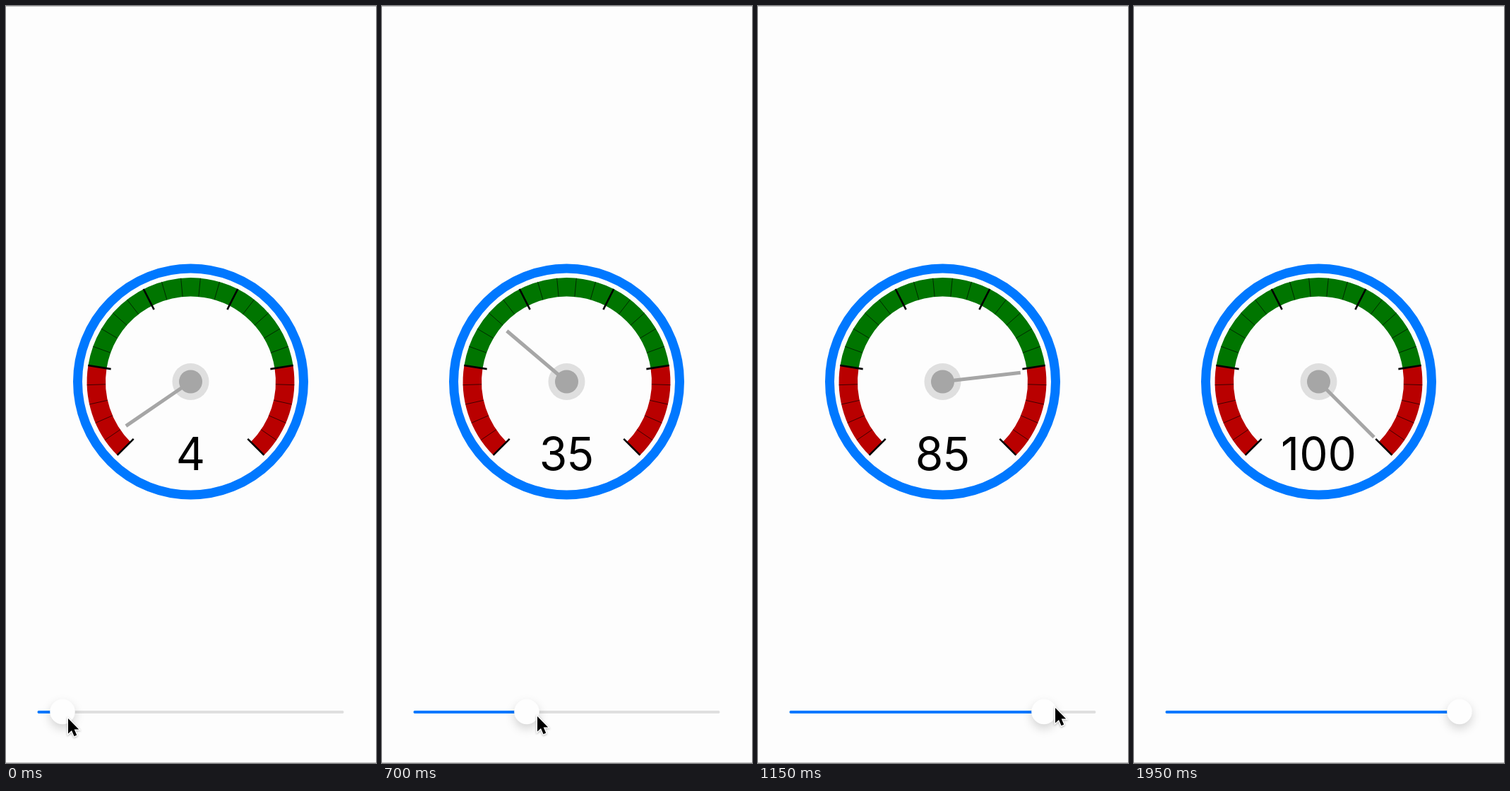
Animation of 524x1070 px, one loop 2000 ms. Source, as an HTML page with a canvas:

```html
<!DOCTYPE html>
<html lang="en">
<head>
<meta charset="utf-8">
<title>Gauge with slider</title>
<style>
  html, body { margin: 0; width: 100%; height: 100%; overflow: hidden; background: #fdfdfd; }
  canvas { display: block; }
</style>
</head>
<body>
<canvas id="stage" width="524" height="1070"></canvas>
<script>
const ctx = document.getElementById('stage').getContext('2d');
const LOOP = 2000, STEP = 50, NEEDLE_LAG = 48;
const CX = 261.5, CY = 531;
const TRACK = { left: 44.5, right: 478.5, y: 998, min: 62, max: 461 };
const BLUE = '#0078ff', PAPER = '#fdfdfd';

// Motion keys: [time, position]
const knobKeys = [[-50, 77.6], [0, 80], [500, 142.5], [700, 205], [950, 314], [1150, 405], [1350, 472]];
const mouseX = [[-50, 85.5], [0, 88], [500, 157], [700, 220], [950, 336], [1150, 421], [1350, 494], [1650, 514], [1800, 528]];
const mouseY = [[0, 1007], [500, 1005], [700, 1004], [950, 995], [1150, 992], [1350, 990], [1800, 990]];

const slope = (a, b) => (b[1] - a[1]) / (b[0] - a[0]);

function tangent(keys, i) {
  if (i === 0) return slope(keys[0], keys[1]);
  if (i === keys.length - 1) return slope(keys[i - 1], keys[i]);
  const before = keys[i][0] - keys[i - 1][0], after = keys[i + 1][0] - keys[i][0];
  return (slope(keys[i - 1], keys[i]) * after + slope(keys[i], keys[i + 1]) * before) / (before + after);
}

// Smooth cubic curve through the keys
function follow(keys, t) {
  const last = keys.length - 1;
  if (t >= keys[last][0]) return keys[last][1];
  let i = 0;
  while (t >= keys[i + 1][0]) i++;
  const [t0, p0] = keys[i], [t1, p1] = keys[i + 1];
  const d = t1 - t0, u = (t - t0) / d, v = 1 - u;
  return v * v * (1 + 2 * u) * p0 + u * u * (3 - 2 * u) * p1 +
    d * u * v * (v * tangent(keys, i) - u * tangent(keys, i + 1));
}

const knobX = t => Math.min(TRACK.max, follow(knobKeys, t));
const fraction = t => (knobX(t) - TRACK.min) / (TRACK.max - TRACK.min);
const angleOf = f => (0.75 + 1.5 * f) * Math.PI;

function disc(x, y, r, color) {
  ctx.fillStyle = color;
  ctx.beginPath();
  ctx.arc(x, y, r, 0, 2 * Math.PI);
  ctx.fill();
}

function arc(r, from, to, width, color) {
  ctx.strokeStyle = color;
  ctx.lineWidth = width;
  ctx.beginPath();
  ctx.arc(CX, CY, r, from, to);
  ctx.stroke();
}

function spoke(angle, inner, outer, width, color) {
  const c = Math.cos(angle), s = Math.sin(angle);
  ctx.strokeStyle = color;
  ctx.lineWidth = width;
  ctx.beginPath();
  ctx.moveTo(CX + inner * c, CY + inner * s);
  ctx.lineTo(CX + outer * c, CY + outer * s);
  ctx.stroke();
}

function drawGauge(value, needle) {
  arc(160, 0, 2 * Math.PI, 13, BLUE);
  arc(133.7, angleOf(0), angleOf(0.2), 26.4, '#b90000');
  arc(133.7, angleOf(0.8), angleOf(1), 26.4, '#b90000');
  arc(133.7, angleOf(0.2), angleOf(0.8), 26.4, '#007500');
  for (let i = 0; i <= 25; i++) {
    const a = angleOf(i / 25);
    if (i % 5) spoke(a, 120.5, 147, 1, 'rgba(0,0,0,0.65)');
    else spoke(a, 114.3, 147, 2.6, '#000');
  }
  disc(CX, CY, 26, '#dfdfdf');
  spoke(angleOf(needle), 0, 111, 5, '#a6a6a6');
  disc(CX, CY, 16.5, '#a6a6a6');
  ctx.fillStyle = '#000';
  ctx.font = '64px Inter, sans-serif';
  ctx.textAlign = 'center';
  ctx.fillText(value, CX, 656);
}

function bar(from, to, color) {
  ctx.strokeStyle = color;
  ctx.lineWidth = 4;
  ctx.lineCap = 'round';
  ctx.beginPath();
  ctx.moveTo(from + 2, TRACK.y);
  ctx.lineTo(to - 2, TRACK.y);
  ctx.stroke();
  ctx.lineCap = 'butt';
}

function drawSlider(x) {
  bar(TRACK.left, TRACK.right, '#dfdfdf');
  bar(TRACK.left, x, BLUE);
  ctx.save();
  ctx.shadowColor = 'rgba(0,0,0,0.17)';
  ctx.shadowBlur = 14;
  ctx.shadowOffsetY = 6;
  disc(x, 997.5, 17.8, '#fefefe');
  ctx.restore();
}

const arrow = new Path2D('M0 0V21.5L5 17L8.6 25.2L12.2 23.6L8.7 15.6H15.2Z');

function drawMouse(x, y) {
  ctx.save();
  ctx.translate(x, y);
  ctx.lineJoin = 'miter';
  ctx.strokeStyle = '#fff';
  ctx.lineWidth = 2.6;
  ctx.shadowColor = 'rgba(0,0,0,0.3)';
  ctx.shadowBlur = 3;
  ctx.shadowOffsetY = 1;
  ctx.stroke(arrow);
  ctx.shadowColor = 'transparent';
  ctx.fillStyle = '#000';
  ctx.fill(arrow);
  ctx.restore();
}

function draw(t) {
  ctx.fillStyle = PAPER;
  ctx.fillRect(0, 0, 524, 1070);
  ctx.fillStyle = '#bdbdbd';
  ctx.fillRect(0, 0, 524, 1);
  ctx.fillRect(0, 1069, 524, 1);
  drawGauge(Math.floor(fraction(t) * 100 + 1e-6), fraction(t - NEEDLE_LAG));
  drawSlider(knobX(t));
  drawMouse(follow(mouseX, t), follow(mouseY, t));
}

const start = performance.now();
function tick() {
  const t = (performance.now() - start) % LOOP;
  draw(Math.floor(t / STEP) * STEP);
  requestAnimationFrame(tick);
}
tick();
</script>
</body>
</html>
```
